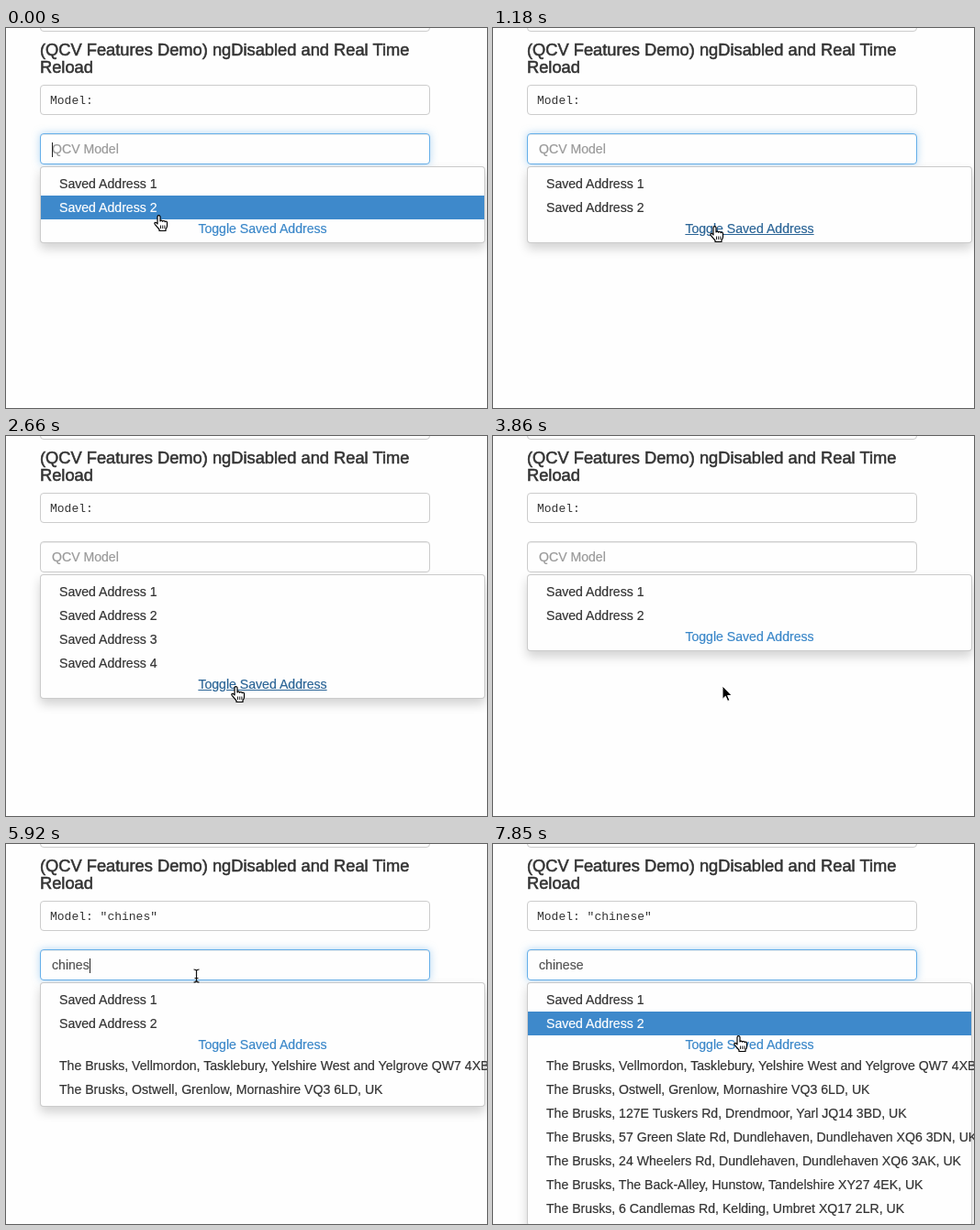
Recreate the animation shown at these times as an HTML page. Size 524 by 415 pixels, loop 8000 ms.

```html
<!DOCTYPE html>
<html lang="en">
<head>
<meta charset="utf-8">
<title>Address typeahead</title>
<style>
  * { box-sizing: border-box; }
  html, body { margin: 0; width: 100%; height: 100%; overflow: hidden; background: #fefefe; }
  body { position: relative; font: 14.1px/20px "Liberation Sans", Arial, sans-serif; color: #333; -webkit-text-stroke: .2px; }
  body > * { position: absolute; margin: 0; white-space: nowrap; }
  .box { left: 37px; width: 425px; border: 1px solid #ccc; border-radius: 4px; }
  #above { top: -30px; height: 34px; }
  h4 { left: 37px; top: 14px; font-size: 18.3px; line-height: 19.4px; font-weight: 400; -webkit-text-stroke: .55px; }
  #model { top: 62px; height: 33px; padding-left: 10px; font: 13px/33px "Liberation Mono", monospace; -webkit-text-stroke: 0; }
  #field { top: 115px; height: 34px; padding: 6px 12px; background: #fefefe; color: #555; box-shadow: inset 0 1px 1px rgba(0,0,0,.075); }
  #field.focus { border-color: #66afe9; box-shadow: inset 0 1px 1px rgba(0,0,0,.075), 0 0 8px rgba(102,175,233,.5); }
  #field.empty::after { content: "QCV Model"; color: #999; }
  #caret { position: absolute; top: 9px; width: 1px; height: 16px; background: #222; }
  #menu { left: 37px; top: 151px; width: 485px; padding: 5px 0; background: #fefefe; border: 1px solid rgba(0,0,0,.2); border-radius: 4px; box-shadow: 0 6px 12px rgba(0,0,0,.175); }
  #menu div { height: 26px; padding: 3px 20px; }
  #menu .active { background: #3e89cb; color: #fff; }
  #menu p { margin: 0; height: 20px; text-align: center; color: #3a87c9; }
  #menu .hover { color: #2a6496; text-decoration: underline; }
  svg { left: 0; top: 0; width: 1px; height: 1px; overflow: visible; }
</style>
</head>
<body>
<div class="box" id="above"></div>
<h4>(QCV Features Demo) ngDisabled and Real Time<br>Reload</h4>
<div class="box" id="model"></div>
<div class="box" id="field"><span id="typed"></span><i id="caret"></i></div>
<div id="menu"></div>
<svg id="cursor">
  <g id="hand" fill="#fff" stroke="#000" stroke-width="1.2" stroke-linejoin="round" transform="translate(-5)">
    <path d="M4 9.5V2.2a1.5 1.5 0 0 1 3 0V7a1.4 1.4 0 0 1 2.6.2a1.4 1.4 0 0 1 2.6.5a1.3 1.3 0 0 1 2.3 1V12q0 2-1.5 3.5v2H6V16Q3.5 13 1.2 10.3Q.3 8.8 1.6 8.4Q2.8 8.2 4 10Z"/>
    <path d="M7.5 11.5v3.5m2.2-3.5v3.5m2.2-3.5v3.5" stroke-width=".9"/>
  </g>
  <path id="arrow" d="M0 0v14.4l3.3-3.1 2.3 5.2 2.3-1-2.3-5h4.6z" stroke="#fff"/>
  <path id="beam" d="M-3.5-7q3 0 3 2v10q0 2-3 2M2.5-7q-3 0-3 2M-.5 5q0 2 3 2M-2.5 2.5h4" fill="none" stroke="#111" stroke-width="1.2"/>
</svg>
<script>
const LOOP = 8000, TICK = 148.1;
const $ = id => document.getElementById(id);

const results = [
  'Vellmordon, Tasklebury, Yelshire West and Yelgrove QW7 4XB',
  'Ostwell, Grenlow, Mornashire VQ3 6LD, UK',
  '127E Tuskers Rd, Drendmoor, Yarl JQ14 3BD, UK',
  '57 Green Slate Rd, Dundlehaven, Dundlehaven XQ6 3DN, UK',
  '24 Wheelers Rd, Dundlehaven, Dundlehaven XQ6 3AK, UK',
  'The Back-Alley, Hunstow, Tandelshire XY27 4EK, UK',
  '6 Candlemas Rd, Kelding, Umbret XQ17 2LR, UK'
].map(place => 'The Brusks, ' + place);

// Each track lists [tick, value]; a value holds until the next key.
const LINK = -1;
const active = [[0, 2], [5, LINK], [11, 0], [12, 3], [16, 4], [17, LINK], [26, 0], [29, LINK],
  [30, 2], [32, 1], [40, 0], [51, 1], [52, 2]];
const saved = [[0, 2], [11, 4], [26, 2]];
const found = [[0, 0], [40, 2], [43, 7]];
const focus = [[0, 1], [11, 0], [33, 1]];
const caret = [[0, 1], [2, 0], [5, 1], [8, 0], [33, 1], [36, 0], [38, 1], [46, 0], [49, 1], [52, 0]];
const letters = [[0, 0], [38, 2], [39, 4], [40, 6], [41, 7]];

// Pointer positions: [tick, x, y]
const path = [[0, 166, 204], [8, 241, 216], [9, 241, 217], [14, 241, 217], [15, 243, 237],
  [18, 250, 273], [27, 250, 273], [33, 208, 144], [48, 208, 144], [53, 267, 209]];

const held = (track, n) => track.findLast(key => key[0] <= n)[1];

function pointer(n) {
  const i = path.findLastIndex(key => key[0] <= n);
  const a = path[i], b = path[i + 1] || a;
  const k = (n - a[0]) / (b[0] - a[0] || 1);
  return [1, 2].map(j => Math.round(a[j] + (b[j] - a[j]) * k));
}

function draw(n) {
  const text = 'chinese'.slice(0, held(letters, n));
  $('model').textContent = 'Model:' + (text && ` "${text}"`);
  $('typed').textContent = text;
  $('field').className = 'box' + (held(focus, n) ? ' focus' : '') + (text ? '' : ' empty');
  $('caret').hidden = !held(caret, n);

  const on = held(active, n), count = held(saved, n);
  const row = (label, i) => `<div class="${i + 1 === on ? 'active' : ''}">${label}</div>`;
  const addresses = Array.from({ length: count }, (_, i) => row('Saved Address ' + (i + 1), i));
  const matches = results.slice(0, held(found, n)).map(label => row(label));
  $('menu').innerHTML = addresses.join('') +
    `<p><span class="${on === LINK ? 'hover' : ''}">Toggle Saved Address</span></p>` + matches.join('');

  const [x, y] = pointer(n);
  const bottom = 183 + 26 * (count + matches.length);
  const shape = y < 151 ? 'beam' : y < bottom ? 'hand' : 'arrow';
  for (const id of ['hand', 'arrow', 'beam']) $(id).style.display = id === shape ? '' : 'none';
  $('cursor').style.transform = `translate(${x}px, ${y}px)`;
}

let shown = -1;
function frame() {
  const n = Math.floor((performance.now() % LOOP + 9) / TICK) % 54;
  if (n !== shown) draw(shown = n);
  requestAnimationFrame(frame);
}
frame();
</script>
</body>
</html>
```
